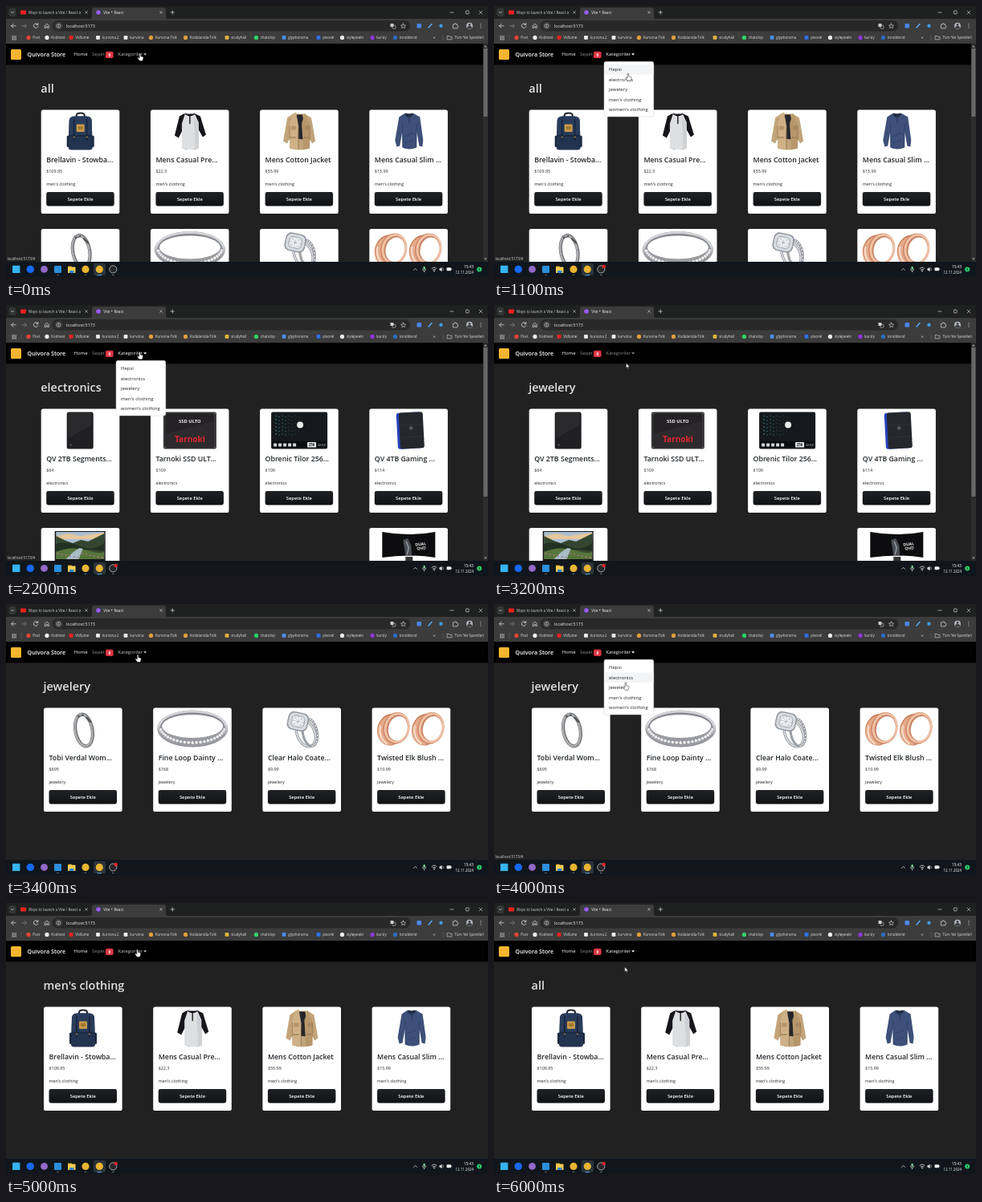
Write an HTML page that moves like this. It is 600 px wide and 338 px high and loops after 6100 ms.

```html
<!DOCTYPE html>
<html lang="tr">
<head>
<meta charset="utf-8">
<title>Shop categories</title>
<style>
html, body { margin: 0; width: 100%; height: 100%; overflow: hidden; background: #212121; }
svg { display: block; width: 100vw; height: 100vh; }
text { font-family: "Open Sans", "Noto Sans", sans-serif; white-space: pre; }
</style>
</head>
<body>
<svg id="stage" viewBox="0 0 600 338"></svg>
<script>
const LOOP = 6100, STEP = 100;

const rect = (x, y, w, h, fill, r = 0, more = '') =>
  `<rect x="${x}" y="${y}" width="${w}" height="${h}" rx="${r}" fill="${fill}" ${more}/>`;
const dot = (x, y, r, fill, more = '') => `<circle cx="${x}" cy="${y}" r="${r}" fill="${fill}" ${more}/>`;
const fill = (d, color, more = '') => `<path d="${d}" fill="${color}" ${more}/>`;
const line = (d, color, w = 0.7, more = '') =>
  `<path d="${d}" fill="none" stroke="${color}" stroke-width="${w}" stroke-linecap="round" stroke-linejoin="round" ${more}/>`;
const disc = (x, y, rx, ry, color) => `<ellipse cx="${x}" cy="${y}" rx="${rx}" ry="${ry}" fill="${color}"/>`;
const oval = (x, y, rx, ry, color, w, more = '') =>
  `<ellipse cx="${x}" cy="${y}" rx="${rx}" ry="${ry}" fill="none" stroke="${color}" stroke-width="${w}" ${more}/>`;
const text = (x, y, s, size, color, weight = 400, anchor = 'start', more = '') =>
  `<text x="${x}" y="${y}" font-size="${size}" fill="${color}" font-weight="${weight}" text-anchor="${anchor}" ${more}>${s}</text>`;
const group = (x, y, s, turn = 0) => `<g transform="translate(${x} ${y}) rotate(${turn})">${s}</g>`;
const repeat = (n, f) => Array.from({ length: n }, (_, i) => f(i)).join('');
const cross = (x, y, r, w = 0.6) => line(`M${x - r} ${y - r}l${2 * r} ${2 * r}m0 ${-2 * r}l${-2 * r} ${2 * r}`, '#ddd', w);

// Product pictures, drawn relative to the card's corner
const stones = (cx, cy, rx, ry, from, to, n, r) => repeat(n, i => {
  const a = (from + (to - from) * i / (n - 1)) * Math.PI / 180;
  return dot((cx + rx * Math.cos(a)).toFixed(1), (cy + ry * Math.sin(a)).toFixed(1), r, '#f4f4f6', 'stroke="#77777d" stroke-width=".5"');
});

const art = {
  backpack:
    line('M44 11V7q0-3 5-3t5 3v4', '#20222c', 2) +
    fill('M32 33l4-2v16l-4-1zM66 33l-4-2v16l4-1z', '#1b2840') +
    fill('M35 14q0-6 7-6h14q7 0 7 6l1 33q0 3-4 3H38q-4 0-4-3z', '#233450') +
    fill('M35 13q1-5 7-5h14q6 0 7 5l.5 18H34.5z', '#293c5b') +
    line('M35 32.5h28', '#172239', 1.2) +
    line('M41 12v26M57 12v26', '#17223a', 1.5) +
    rect(44, 18, 10, 9.5, '#c69a4b', 1) + rect(46, 20.5, 6, 4, '#9d7430', 1) +
    dot(41, 34, 1, '#9f814b') + dot(57, 34, 1, '#9f814b'),
  raglan:
    fill('M41 5l-5 3-6 24 5 3 5-10v23q9 3 20 0V25l5 9 4-3-7-23-6-3z', '#16161a') +
    fill('M43 5q6 4 12 0l5 11v32q-10 3.5-21 0V17z', '#dedfe1') +
    fill('M54 8l6 9v31l-4 1z', '#cfd0d4') +
    line('M43.5 5q5.5 4.5 11.5 0', '#15151a', 1.3) + line('M49 8v9', '#222', 1.5),
  jacket:
    fill('M41 5l-7 5-5 29 5 3 3-6v12q12 4 25 0V37l3 5 4-3-5-29-8-5z', '#c2a47b') +
    fill('M45 6h8l2 13-1 18-7-1z', '#25262b') +
    fill('M41 5l4-2 3 17-1 29q-6 0-10-1V18z', '#cfb188') +
    fill('M56 4l-4 13 2 32q5 0 8-1V18z', '#b8976b') +
    line('M37 20v17M62 20v17M48 20v28', '#8d7049', 0.7) +
    rect(38, 34, 7, 1.2, '#957850') + rect(55, 34, 6, 1.2, '#957850') +
    rect(39, 20, 6, 5, '#b4946a', 0.5) + rect(56, 20, 5, 5, '#a98a60', 0.5),
  slim:
    fill('M43 5l-6 4-5 29 2 8 4-1 3-18v20q8 4 18 0V27l3 18 4 1 1-8-4-29-7-4z', '#3d5079') +
    fill('M44 5q5 8 11 0l-2-1q-4 2-7 0z', '#222c47') +
    line('M44 5q5 11 11 0M49.5 10v6', '#2b395a', 1) +
    line('M41 18l1 28M59 18l-1 28M44 33l11-4M44 41l11-3', '#31436a', 0.9),
  bracelet: group(50, 28,
    oval(0, 0, 10.5, 20, '#66686b', 4.2) + oval(-0.3, 0, 10.5, 20, '#c3c5c7', 2.4) +
    oval(0, 0, 10.5, 20, '#77797c', 1.6, 'stroke-dasharray=".7 1"') +
    line('M-4-18l6-1M6-15l4 6', '#4e5053', 2.2) + dot(-1, -20, 2, '#9b9da0'), -10),
  band:
    disc(49, 26, 44, 23, '#8b8d92') + disc(49, 25, 43.5, 22, '#d3d4d7') + disc(49, 27.5, 42, 20.5, '#9a9ca1') +
    disc(49, 22, 39, 16, '#85878c') + disc(49, 23, 38, 14.5, '#fff') +
    stones(49, 23, 40.5, 20.5, 12, 168, 23, 2.2),
  solitaire:
    group(54, 32, oval(0, 0, 11, 17, '#8e9299', 3.4) + oval(0, 0, 11, 17, '#d9dbdf', 1.8), -22) +
    group(59, 31, oval(0, 0, 9, 17, '#9b9fa6', 3) + stones(0, 0, 9, 17, -70, 90, 12, 1.3), -10) +
    group(44, 17,
      rect(-13, -11.5, 26, 23, '#9297a0', 7) + rect(-11.5, -10, 23, 20, '#d9dde2', 6) +
      rect(-8.5, -7.5, 17, 15, '#9fa6b1', 5) + rect(-7.5, -6.5, 15, 13, '#e3e7ec', 4) +
      fill('M0-6.5l6 6.5-6 6.5-6-6.5z', '#fafbfc') + line('M-7 0H7M0-6v12M-5-5l10 10M5-5l-10 10', '#9aa1ac', 0.5), 12),
  pair: [27, 70].map(x => group(x, 26,
    disc(-3, 2, 17, 20, '#c87f5d') + disc(-4, 3, 15, 18.5, '#e5ab8b') +
    line('M-17 1q1 14 13 19', '#f7dccb', 2) + disc(3, -1.5, 16.5, 20, '#cf8a68') + disc(3.6, -2, 15.6, 19, '#f0c2a6') +
    disc(4, -2, 13, 16.5, '#c98363') + disc(5, -1.5, 11.8, 15.5, '#fff'), 14)).join(''),
  drive:
    rect(32, 4, 33, 46, '#1c1c1e', 2.5) + rect(33, 5, 30, 44, '#2a2a2d', 2) +
    fill('M33 37l30-17v27q0 2-2 2H35q-2 0-2-2z', '#202022') + dot(37, 45, 0.9, '#77777b'),
  ssd:
    rect(16, 4, 66, 46, '#353336', 2) + rect(19, 6, 60, 42, '#242225', 1.5) +
    fill('M19 31l60-15v30q0 2-2 2H20z', '#2d2a2d') +
    text(49, 17.5, 'SSD ULTO', 5.8, '#f1f1f1', 700, 'middle') + text(49, 41, 'Tarnoki', 10, '#e3262f', 700, 'middle') +
    [[18, 6], [80, 6], [18, 48], [80, 48]].map(p => dot(...p, 0.8, '#7d7d80')).join(''),
  solid:
    rect(14, 4, 70, 46, '#15191b', 2) +
    repeat(48, i => dot(20 + i % 8 * 4, 9 + Math.floor(i / 8) * 4.5 + i % 8 % 2, 0.4 + (7 - i % 8) * 0.07, '#2c6f74')) +
    dot(50, 20, 4, '#e7eceb') + rect(15, 40.5, 68, 8, '#0c0d0e') +
    repeat(5, i => rect(17 + i * 6, 43, 4, 4, '#cfd3d3', 0.6)) +
    rect(59, 41.5, 11, 6.5, '#eee', 0.5) + text(64.5, 46.4, '256', 4.4, '#111', 700, 'middle') + text(72, 46.5, 'GB SSD', 2.8, '#ddd'),
  gaming: group(51, 27,
    rect(-16.5, -22.5, 30, 45, '#2743bd', 3) + rect(-13.5, -22.5, 30, 45, '#25272c', 3) +
    line('M-12-7h27M-12 8h27', '#31343a', 0.7) + rect(-1, -5, 4, 4, '#565a63', 0.5), -3),
  tv:
    rect(17, 4, 63, 38, '#151515', 0.6) + rect(18.5, 5, 60, 34, '#a9bfd2') +
    fill('M18.5 10l16-3 14 3 30-4v8h-60z', '#e6c79b') +
    fill('M18.5 10l12 6 9 3 10-4 9 2 20-10v32h-60z', '#34452f') +
    fill('M18.5 20q14-4 30 3t30-4v10q-20-4-32 0t-28 0z', '#203022') +
    fill('M18.5 30q18-8 39-2t21 0v11h-60z', '#56753a') + fill('M31 39q9-10 17-14l4 1q-3 7-5 13z', '#a8bcc4') +
    repeat(12, i => dot(21 + i * 5, 32 + i * 7 % 6, 1, '#b8708f')),
  monitor:
    fill('M16 5q32 6 66 0v32q-33-5-66 0z', '#0d0d0f') + fill('M42 15l6-2 4 9 1 13-8-1z', '#4b4e53') +
    line('M46 17l3 8-2 8', '#b9bcc1', 1) +
    text(64, 22, 'DUAL', 5, '#eee', 700, 'middle', 'transform="rotate(-6 64 22)"') +
    text(65, 27, 'QHD', 5, '#ddd', 700, 'middle', 'transform="rotate(-6 65 27)"') + rect(45, 36, 9, 6, '#333')
};

const clothes = [
  ['backpack', 'Brellavin - Stowba...', '$109.95'], ['raglan', 'Mens Casual Pre...', '$22.3'],
  ['jacket', 'Mens Cotton Jacket', '$55.99'], ['slim', 'Mens Casual Slim ...', '$15.99']
].map(p => [...p, "men's clothing"]);
const jewels = [
  ['bracelet', 'Tobi Verdal Wom...', '$695'], ['band', 'Fine Loop Dainty ...', '$168'],
  ['solitaire', 'Clear Halo Coate...', '$9.99'], ['pair', 'Twisted Elk Blush ...', '$10.99']
].map(p => [...p, 'jewelery']);
const devices = [
  ['drive', 'QV 2TB Segments...', '$64'], ['ssd', 'Tarnoki SSD ULT...', '$109'],
  ['solid', 'Obrenic Tilor 256...', '$109'], ['gaming', 'QV 4TB Gaming ...', '$114']
].map(p => [...p, 'electronics']);

const card = ([pic, name, price, kind], col, row, dx) => group(43.7 + col * 136.2 + dx, 129.5 + row * 148.5,
  rect(0, 0, 97.6, 129.5, '#fff', 2.6) + art[pic] +
  text(6.5, 65.8, name, 8.8, '#212529', 600) + text(6.5, 78, price, 5.4, '#212529') +
  text(6.5, 94, kind, 5.4, '#212529') +
  rect(6.5, 102.5, 84.5, 17.5, 'url(#btn)', 2.4) + text(48.8, 113.4, 'Sepete Ekle', 5.8, '#fff', 600, 'middle'));

const shelf = (id, top, below, thumb) => `<g id="${id}">` +
  top.map((p, i) => card(p, i, 0, thumb ? 0 : 3.3)).join('') +
  below.map(([p, col]) => card(p, col, 1, 0)).join('') +
  (thumb ? rect(593.7, 47, 6.3, 272, '#2c2c2c') + rect(594.4, 53, 5, thumb, '#686868') +
    fill('M595 51.5l1.8-2.4 1.8 2.4zM595 314.5l1.8 2.4 1.8-2.4z', '#9b9b9b') : '') + '</g>';

// Browser chrome
const marks = [
  [28, 'Post', '#ea4335'], [51, 'Kodnest', '#f0f0f0'], [81, 'Vidlume', '#f02020', 1], [114.5, 'kurvona 2', '#eee', 1],
  [149, 'kurvona', '#eee', 1], [180.5, 'Kurvona-Tolk', '#e0a03a'], [223.5, 'Kodalanida-Tolk', '#e0a03a'],
  [275, 'studyhall', '#e0b53a', 1], [311.5, 'chatolop', '#2fd366'], [346, 'glyphorama', '#4a8df0', 1],
  [389, 'pixorel', '#2d6fe8', 1], [418.5, 'stylepeekr', '#eee'], [456, 'kursly', '#8d35e0'], [484.5, 'tonoblend', '#2c6cc0']
];
const browser =
  rect(0, 0, 600, 16, '#1f2020') + rect(3.5, 3, 9, 10, '#343535', 2.5) + line('M6.4 7.3l1.6 1.6 1.6-1.6', '#ddd') +
  rect(18, 5.5, 7, 5, '#f02020', 1) + text(28, 9.8, 'Ways to launch a Vite / React a', 4.6, '#d0d0d0') + cross(100, 7.9, 1.4) +
  fill('M104 16q3 0 3-3V5q0-3 3-3h86q3 0 3 3v8q0 3 3 3z', '#3c3c3c') +
  dot(115, 7.9, 2.7, '#9b5cff') + text(121.3, 9.8, 'Vite + React', 4.6, '#f0f0f0') + cross(193, 7.9, 1.4) +
  line('M205 7.9h4.4M207.2 5.7v4.4', '#ddd') + line('M553 8h4', '#eee', 0.6) +
  rect(572.4, 6, 3.8, 3.8, 'none', 0.5, 'stroke="#eee" stroke-width=".6"') + cross(591, 8, 1.9) +
  rect(0, 16, 600, 31, '#3c3c3c') + rect(57.5, 18, 446, 13.5, '#282828', 6.7) +
  line('M12 24.8H6.6m2.5-2.5l-2.5 2.5 2.5 2.5', '#ddd', 0.8) + line('M20 24.8h5.4m-2.5-2.5l2.5 2.5-2.5 2.5', '#858585', 0.8) +
  line('M39.5 23a2.8 2.8 0 1 0 .3 2.6M39.8 21.5v2h-2', '#ddd', 0.8) +
  line('M48.5 24.2l2.4-2 2.4 2v3.2h-1.6v-2h-1.6v2h-1.6z', '#ddd', 0.7) +
  dot(65.5, 24.8, 5, '#3c3c3c') + dot(65.5, 24.8, 2.4, 'none', 'stroke="#ddd" stroke-width=".6"') + line('M65.5 24.6v1.4M65.5 23.4v.1', '#ddd', 0.6) +
  text(75, 26.8, 'localhost:5173', 5.3, '#eee') +
  rect(478.5, 22, 4, 4, '#ccc', 0.6) + rect(481, 24.2, 4, 4, 'none', 0.6, 'stroke="#ccc" stroke-width=".6"') +
  line('M494.5 22l.9 2 2.1.2-1.6 1.4.5 2.1-1.9-1.1-1.9 1.1.5-2.1-1.6-1.4 2.1-.2z', '#ddd', 0.6) +
  rect(511.5, 22, 5.5, 5.5, '#4a86e8', 0.8) + line('M526 27l4-4.5', '#5aa9f5', 1.5) + dot(541.5, 24.8, 2.2, '#3f9be0') +
  line('M556.8 23h1.5q0-1.4 1-1.4t1 1.4h1.5v1.7q1.2 0 1.2 1t-1.2 1v1.2h-5z', '#ddd', 0.7) +
  dot(577, 24.8, 4, '#b4b8bc') + dot(577, 23.5, 1.4, '#3a3a3e') + fill('M574 27.4q0-2.3 3-2.3t3 2.3q-3 2-6 0z', '#3a3a3e') +
  repeat(3, i => dot(591, 22.6 + i * 2.2, 0.6, '#ddd')) +
  repeat(9, i => rect(7.5 + i % 3 * 2, 37.2 + Math.floor(i / 3) * 2, 1.3, 1.3, '#c8c8c8')) +
  rect(18.7, 36, 0.6, 7, '#666') + rect(543.7, 36, 0.6, 7, '#666') +
  marks.map(([x, s, c, square]) => (square ? rect(x - 2.4, 37, 4.8, 4.8, c, 0.8) : dot(x, 39.4, 2.6, c)) +
    text(x + 5.2, 41.1, s, 4.5, '#dcdcdc')).join('') +
  text(531.5, 41.3, '»', 6, '#ddd') +
  line('M549.5 37.4h2l.8.9h2.7v3.5h-5.5z', '#ddd', 0.6) + text(558.5, 41.1, 'Tüm Yer İşaretleri', 4.5, '#dcdcdc');

const navbar =
  rect(0, 47, 593.7, 26.3, '#000') + rect(593.7, 47, 6.3, 26.3, '#000', 0, 'id="corner"') + rect(6, 54, 13, 13, '#f5b52e', 1.5) +
  text(26.5, 63.2, 'Quivora Store', 7.2, '#fff', 600) + text(84.5, 62.4, 'Home', 6, '#fff', 500) +
  text(107, 62.4, 'Sepet', 6, '#8c8c8c') + rect(124, 56.8, 9.6, 8.2, '#dc3545', 1.8) +
  text(128.8, 62.8, '0', 4.8, '#fff', 700, 'middle') +
  `<g id="toggle">${text(139.3, 62.4, 'Kategoriler', 6, 'currentColor')}${fill('M171 59.3h4.2l-2.1 2.2z', 'currentColor')}</g>`;

const kinds = ['Hepsi', 'electronics', 'jewelery', "men's clothing", "women's clothing"];
const menu = '<g id="menu">' + rect(137, 69.3, 61.8, 68.8, '#fff', 2.3, 'stroke="#c8c8c8" stroke-width=".4"') +
  rect(137.2, 73, 61.4, 12.5, '#f3f4f5', 0, 'id="hover"') +
  kinds.map((s, i) => text(143, 81.2 + i * 12.5, s, 6, '#212529')).join('') + '</g>';

const taskbar =
  rect(0, 319, 600, 19, '#10161c') + rect(8, 323.7, 9.4, 9.4, '#35b4f2', 0.6) + dot(30.3, 328.4, 4.7, '#1769f5') +
  dot(47.5, 328.4, 4.4, '#9469c9') + rect(60, 324, 9, 9, '#2b8fdc', 1) +
  rect(77, 324.5, 5, 3, '#d9981f', 0.6) + rect(77, 325.5, 9.5, 7.5, '#f8cc50', 0.8) + rect(79, 330, 5.5, 3, '#2d87d4', 0.5) +
  rect(109, 321, 15, 15, '#2c333a', 2) + dot(99, 328.4, 4.6, '#e8b431') + dot(116.3, 328.4, 4.6, '#e8b431') +
  dot(133.3, 328.4, 4.6, '#26272b', 'stroke="#ddd" stroke-width=".7"') + dot(136.7, 325, 2.3, '#e8242c', 'id="badge"') +
  [64.5, 99, 133.3].map(x => rect(x - 1.3, 335.3, 2.6, 0.8, '#999', 0.4)).join('') + rect(113.3, 335.3, 6, 0.9, '#5fb4ee', 0.4) +
  line('M507.5 329.4l2-2 2 2', '#eee') + rect(519.5, 324.8, 2.2, 4.2, '#7fd89b', 1.1) + line('M518.4 328q0 2.4 2.2 2.4t2.2-2.4M520.6 330.4v1.5', '#eee', 0.6) +
  line('M530 327.4q3-3 6 0M531.3 329q1.7-1.6 3.4 0', '#eee', 0.8) + dot(533, 330.6, 0.8, '#eee') +
  fill('M539.5 327.3h1.2l1.8-1.6v5.6l-1.8-1.6h-1.2z', '#eee') + line('M544 327q1 1.4 0 2.8', '#eee', 0.6) +
  rect(548.5, 326.3, 5.5, 4, '#eee', 0.8) + rect(554.3, 327.5, 0.8, 1.6, '#eee') +
  text(582, 327, '15:43', 4.8, '#fff', 400, 'end') + text(582, 333.8, '12.11.2024', 4.4, '#fff', 400, 'end') +
  dot(589.2, 328.4, 3, '#2fcf6e') + text(589.2, 330, '3', 4.2, '#10161c', 600, 'middle');

const stage = document.getElementById('stage');
stage.innerHTML =
  '<defs><linearGradient id="btn" x2="0" y2="1"><stop stop-color="#202225"/><stop offset="1" stop-color="#101113"/></linearGradient></defs>' +
  rect(0, 0, 600, 338, '#212121') +
  shelf('all', clothes, jewels.map((p, i) => [p, i]), 85) +
  shelf('electronics', devices, [[['tv', '', '', ''], 0], [['monitor', '', '', ''], 3]], 186) +
  shelf('jewelery', jewels, []) + shelf('men', clothes, []) +
  text(43.3, 107.6, '', 14.4, '#e2e2e2', 600, 'start', 'id="title"') +
  browser + navbar + menu +
  text(1.5, 316.7, 'localhost:5173/#', 4.5, '#d5d5d5', 400, 'start', 'id="status"') +
  taskbar +
  '<g id="arrow">' + fill('M0 0v6l1.4-1.2 1 2.2 1-.5-1-2.1h1.9z', '#fff', 'stroke="#111" stroke-width=".45"') + '</g>' +
  '<g id="hand">' + fill('M-.9.9q0-.9.8-.9t.8.9v2.8l2.5.6q.9.3.8 1.4l-.5 2.6q-.3 1.2-1.5 1.2H.1q-.8 0-1.3-.9l-1.9-2.7q-.2-.9.6-.9l1.6 1z',
    '#fff', 'stroke="#111" stroke-width=".5"') + '</g>';

const ui = Object.fromEntries([...stage.querySelectorAll('[id]')].map(e => [e.id, e]));
const show = (e, on) => { e.style.display = on ? '' : 'none'; };

// Timelines: [start, value]
const titles = [[0, 'all'], [1400, 'electronics'], [2800, 'jewelery'], [4300, "men's clothing"], [5900, 'all']];
const shelves = [[0, 'all'], [1700, 'electronics'], [3400, 'jewelery'], [4600, 'men']];
const opened = [[0, 0], [300, 1], [1400, 0], [2000, 1], [2800, 0], [3700, 1], [4300, 0], [5200, 1], [5900, 0]];
const linked = [[0, 1], [1600, 0], [2200, 1], [2800, 0], [3600, 1], [4700, 0], [5100, 1], [5700, 0]];
const pointer = [
  [0, 167, 59], [800, 167, 59.5], [1100, 167, 84], [1300, 167, 91], [1500, 167, 91], [1900, 166.5, 58.3],
  [2200, 166.5, 58.3], [2600, 166, 103], [2800, 166, 103], [3200, 164.5, 72.5], [3500, 164, 58.3], [3700, 164, 58.3],
  [4000, 164, 97.9], [4200, 164, 113], [4400, 164, 113], [4800, 163.7, 57.8], [5300, 163.7, 57.8], [5600, 163, 79], [6100, 162.7, 80]
];

const at = (list, t) => list.filter(k => k[0] <= t).pop()[1];

function pointerAt(t) {
  const i = pointer.findIndex(k => k[0] > t);
  const [a, x, y] = pointer[i - 1], [b, x2, y2] = pointer[i];
  const p = (t - a) / (b - a);
  return [x + (x2 - x) * p, y + (y2 - y) * p];
}

function draw(t) {
  const [x, y] = pointerAt(t), open = at(opened, t), name = at(shelves, t);
  const scroll = name === 'all' || name === 'electronics';
  for (const id of ['all', 'electronics', 'jewelery', 'men']) show(ui[id], id === name);
  show(ui.corner, !scroll);
  ui.title.textContent = at(titles, t);
  ui.title.setAttribute('x', scroll ? 43.3 : 46.6);
  show(ui.menu, open);
  const row = Math.floor((y - 73) / 12.5), onItem = open && row >= 0;
  show(ui.hover, onItem);
  ui.hover.setAttribute('y', 73 + Math.max(row, 0) * 12.5);
  const onToggle = y < 67;
  ui.toggle.style.color = open || t >= 5900 ? '#fff' : onToggle ? '#c4c4c4' : '#8c8c8c';
  show(ui.status, at(linked, t));
  show(ui.badge, t >= 100);
  const hand = onToggle || onItem;
  show(ui.hand, hand);
  show(ui.arrow, !hand);
  ui[hand ? 'hand' : 'arrow'].setAttribute('transform', `translate(${x} ${y})`);
}

const begin = performance.now();
function tick(now) {
  const t = Math.max(0, now - begin) % LOOP;
  draw(Math.floor(t / STEP) * STEP);
  requestAnimationFrame(tick);
}
draw(0);
requestAnimationFrame(tick);
</script>
</body>
</html>
```
